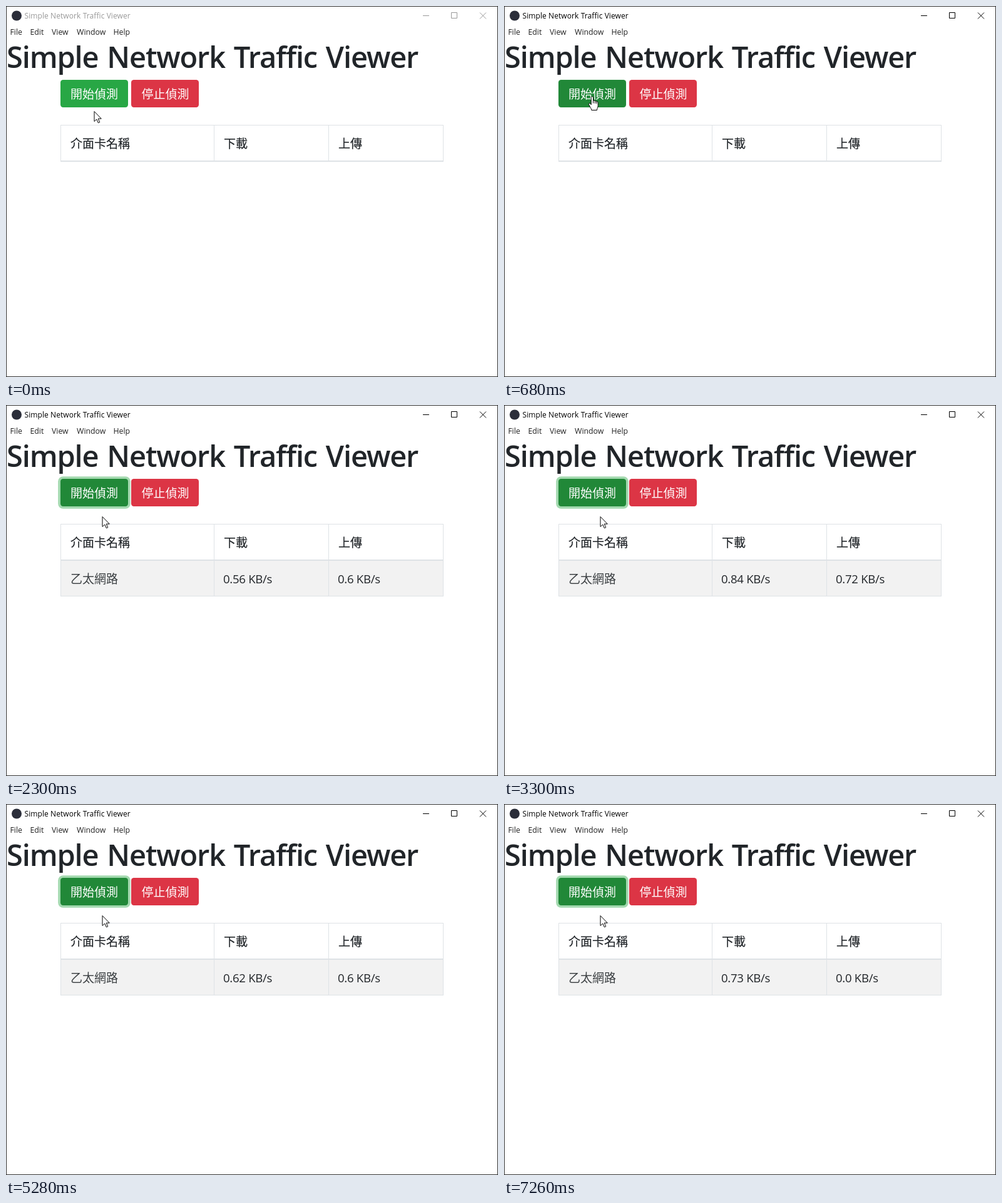
An HTML page that plays this animation: 786x593 px, repeating every 8000 ms.

```html
<!DOCTYPE html>
<html lang="zh-Hant">
<head>
<meta charset="utf-8">
<title>Simple Network Traffic Viewer</title>
<style>
html, body { margin: 0; width: 100%; height: 100%; overflow: hidden; background: #fff; }
svg { display: block; width: 786px; height: 593px; }
text { font-family: "Open Sans", "Noto Sans", sans-serif; fill: #212529; white-space: pre; }
.title { font-size: 12px; letter-spacing: .08px; }
.menu { font-size: 12.3px; fill: #222; }
.h1 { font-size: 47px; font-weight: 600; letter-spacing: -1.15px; word-spacing: 2.8px; }
.cjk { font-family: "Noto Sans CJK TC", "Noto Sans CJK", "Noto Sans CJK JP", sans-serif; font-size: 19px; }
.btn { fill: #fff; }
.head { stroke: #212529; stroke-width: .2px; }
.light { font-weight: 300; fill: #3c4043; }
.rate { font-size: 18.6px; letter-spacing: -.3px; }
.grid { fill: none; stroke: #dee2e6; }
.cursor { fill: #fff; stroke: #000; stroke-linejoin: round; }
</style>
</head>
<body>
<svg viewBox="0 0 786 593">
  <rect x=".5" y=".5" width="785" height="592" fill="#fff" stroke="#333"/>
  <circle cx="17" cy="15.5" r="8" fill="#2b2e3a"/>
  <text id="title" class="title" x="29.5" y="20">Simple Network Traffic Viewer</text>
  <path id="controls" fill="none" d="M666 15.5h10M711.5 10.5h9v9h-9zM757 10.5l10 10M767 10.5l-10 10"/>
  <g>
    <text class="menu" x="6.5" y="46">File</text>
    <text class="menu" x="38.5" y="46">Edit</text>
    <text class="menu" x="73" y="46">View</text>
    <text class="menu" x="113" y="46">Window</text>
    <text class="menu" x="171.5" y="46">Help</text>
  </g>
  <text class="h1" x="1" y="99">Simple Network Traffic Viewer</text>

  <rect id="ring" fill="#48b461" fill-opacity=".5"/>
  <rect id="start" x="87" y="118" width="108" height="44" rx="4.2"/>
  <rect x="200" y="118" width="108" height="44" rx="4.2" fill="#dc3545"/>
  <text class="cjk btn" x="103" y="148">開始偵測</text>
  <text class="cjk btn" x="216.5" y="148">停止偵測</text>

  <path class="grid" d="M87 190.5H699M87.5 190V248M332.5 190V248M515.5 190V248M698.5 190V248"/>
  <text class="cjk head" x="103" y="227">介面卡名稱</text>
  <text class="cjk head" x="348" y="227">下載</text>
  <text class="cjk head" x="531" y="227">上傳</text>
  <g id="row">
    <path fill="#f2f2f2" d="M87 249H699V306H87z"/>
    <path class="grid" d="M87 305.5H699M87.5 248V306M332.5 248V306M515.5 248V306M698.5 248V306"/>
    <text class="cjk light" x="103" y="285">乙太網路</text>
    <text id="down" class="rate" x="347" y="285"></text>
    <text id="up" class="rate" x="530" y="285"></text>
  </g>
  <path class="grid" stroke-width="2" d="M87 248H699"/>

  <path id="arrow" class="cursor" d="M0 .5V16.5L3.8 13L6.3 18.8L8.7 17.8L6.3 12.1H11.3z"/>
  <g id="hand" class="cursor">
    <path d="M-1.8 1.3C-1.8-.7 1.5-.7 1.5 1.3V6.5C2.2 5.5 4.2 5.8 4.3 7.2C5.2 6.3 6.8 6.7 6.9 8.1C7.8 7.5 9.2 8 9.2 9.4V14.5C9.2 17 7.5 18.2 7.5 21.5H-1.2C-1.2 18.5-4 16.5-5.4 12.5C-6 10.7-4.2 9.7-3.1 11L-1.8 12.7z"/>
    <path fill="none" d="M1.5 6.5V10.5M4.3 7.2V10.8M6.9 8.1V11.2"/>
  </g>
</svg>
<script>
const LOOP = 8000;
const STEPS = [0, 70, 130, 190, 260, 320, 680, 750, 830, 910, 980, 1060];
const RATES = [
  [2300, '0.56', '0.6'],
  [3300, '0.84', '0.72'],
  [4290, '1.1', '0.7'],
  [5280, '0.62', '0.6'],
  [6270, '1.11', '1.44'],
  [7260, '0.73', '0.0'],
];
const GREEN = [40, 167, 69], DARK_GREEN = [33, 136, 56];

const el = id => document.getElementById(id);
const set = (id, attrs) => {
  for (const k in attrs) el(id).setAttribute(k, attrs[k]);
};
const show = (id, on) => set(id, { visibility: on ? 'visible' : 'hidden' });
const ramp = (t, from, to) => Math.min(1, Math.max(0, (t - from) / (to - from)));
const smooth = p => p * p * (3 - 2 * p);
const mix = (a, b, p) => a + (b - a) * p;

function pointer(t) {
  if (t < 680) {
    const p = ramp(t, 0, 320);
    return [141, Math.round(mix(168, 145, 1 - (1 - p) ** 2))];
  }
  const p = smooth(ramp(t, 680, 1060));
  return [Math.round(mix(141, 154, p)), Math.round(mix(145, 178, p))];
}

function render(time) {
  const t = STEPS.filter(s => s <= time).pop();
  const [x, y] = pointer(t);
  const over = y < 162;
  const move = `translate(${x} ${y})`;
  set('arrow', { transform: move });
  set('hand', { transform: move });
  show('arrow', !over);
  show('hand', over);

  const active = t >= 680;
  set('title', { style: `fill:${active ? '#000' : '#999'}` });
  set('controls', { stroke: active ? '#000' : '#999' });

  const hover = ramp(t, 70, 220);
  const rgb = GREEN.map((c, i) => Math.round(mix(c, DARK_GREEN[i], hover)));
  set('start', { fill: `rgb(${rgb})` });

  // The press lands just before the first sampled step.
  const focus = ramp(t, 660, 810), w = 3.8 * focus;
  set('ring', {
    x: 87 - w, y: 118 - w, width: 108 + 2 * w, height: 44 + 2 * w,
    rx: 4.2 + w, opacity: focus,
  });

  const rate = RATES.filter(r => r[0] <= time).pop();
  show('row', rate);
  el('down').textContent = rate ? rate[1] + ' KB/s' : '';
  el('up').textContent = rate ? rate[2] + ' KB/s' : '';
}

const begin = performance.now();
function tick() {
  render((performance.now() - begin) % LOOP);
  requestAnimationFrame(tick);
}
tick();
</script>
</body>
</html>
```
